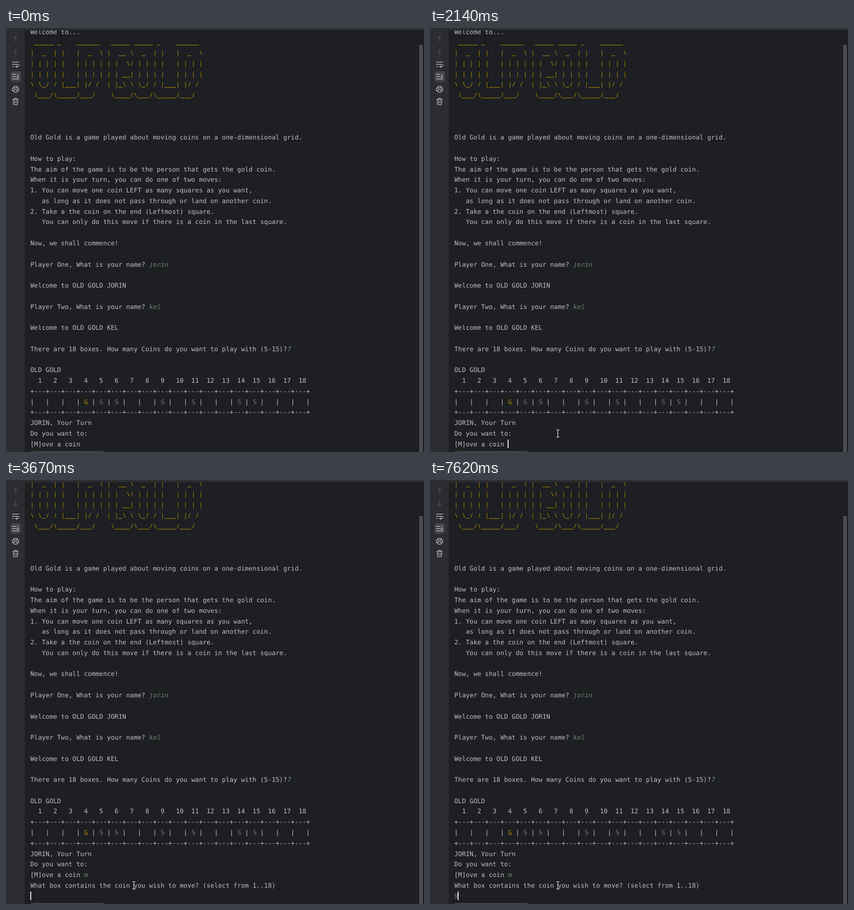
An HTML page with a canvas that plays this animation: 744x753 px, repeating every 8000 ms.

```html
<!DOCTYPE html>
<html lang="en">
<head>
<meta charset="utf-8">
<title>Old Gold console</title>
<style>
html, body { margin: 0; width: 100%; height: 100%; overflow: hidden; background: #1e1f22; }
canvas { display: block; }
</style>
</head>
<body>
<canvas id="stage" width="744" height="753"></canvas>
<script>
const W = 744, H = 753, LOOP = 8000;
const ctx = document.getElementById('stage').getContext('2d', { alpha: false });

const LEFT = 43.3, CHAR = 6.83, ROW = 18.77, LAST_ROW = 39, BASE = 742.6;
const TEXT_FONT = '11.34px "DejaVu Sans Mono", monospace';
const LOGO_FONT = '500 11.38px "Noto Sans Mono", monospace';
const BG = '#1e1f22', PANEL = '#2b2d30', TEXT = '#bcbec4', GOLD = '#a68a0d',
      SILVER = '#74777c', INPUT = '#6a836e', ICON = '#ced0d6', DIM = '#55585d',
      THUMB = '#4b4c4f';

const NAMES = ['jorin', 'kel'];
const COINS = [5, 6, 9, 11, 14, 15], GOLD_BOX = 4, BOXES = 18;

const LOGO = String.raw`
 _____ _    ______   _____ _____ _    ______
|  _  | |   |  _  \ |  __ \  _  | |   |  _  \
| | | | |   | | | | | |  \/ | | | |   | | | |
| | | | |   | | | | | | __| | | | |   | | | |
\ \_/ / |___| |/ /  | |_\ \ \_/ / |___| |/ /
 \___/\_____/___/    \____/\___/\_____/___/`.split('\n').slice(1);

const boxes = Array.from({ length: BOXES }, (_, i) => i + 1);
const edge = '+---'.repeat(BOXES) + '+';

// Each row: [text, typed input]
const rows = [
  ['Welcome to...'],
  ...LOGO.map(() => []),
  [], [], [],
  ['Old Gold is a game played about moving coins on a one-dimensional grid.'],
  [],
  ['How to play:'],
  ['The aim of the game is to be the person that gets the gold coin.'],
  ['When it is your turn, you can do one of two moves:'],
  ['1. You can move one coin LEFT as many squares as you want,'],
  ['   as long as it does not pass through or land on another coin.'],
  ['2. Take a the coin on the end (Leftmost) square.'],
  ['   You can only do this move if there is a coin in the last square.'],
  [],
  ['Now, we shall commence!'],
  [],
  ['Player One, What is your name? ', NAMES[0]],
  [],
  ['Welcome to OLD GOLD ' + NAMES[0].toUpperCase()],
  [],
  ['Player Two, What is your name? ', NAMES[1]],
  [],
  ['Welcome to OLD GOLD ' + NAMES[1].toUpperCase()],
  [],
  ['There are 18 boxes. How many Coins do you want to play with (5-15)?', '7'],
  [],
  ['OLD GOLD'],
  [boxes.map(n => ('  ' + n).padEnd(4)).join('')],
  [edge],
  ['|   '.repeat(BOXES) + '|'],
  [edge],
  [NAMES[0].toUpperCase() + ', Your Turn'],
  ['Do you want to:'],
  ['[M]ove a coin ']
];
const LOGO_ROW = 1, BOARD_ROW = 35;
const QUESTION = 'What box contains the coin you wish to move? (select from 1..18)';

const colX = col => LEFT + col * CHAR;

function write(str, col, row, color = TEXT, font = TEXT_FONT) {
  ctx.font = font;
  ctx.fillStyle = color;
  ctx.fillText(str, colX(col), Math.round(BASE + (row - LAST_ROW) * ROW));
}

const writeInput = (str, col, row) => write(str, col, row, INPUT, 'italic ' + TEXT_FONT);

function rect(x, y, w, h, color) {
  ctx.fillStyle = color;
  ctx.fillRect(x, y, w, h);
}

function icon(cy, d, color = ICON) {
  ctx.save();
  ctx.translate(17, cy);
  ctx.strokeStyle = color;
  ctx.lineWidth = 1;
  ctx.stroke(new Path2D(d));
  ctx.restore();
}

function drawToolbar() {
  rect(0, 0, 33.5, H, PANEL);
  rect(0, 0, W, 4, PANEL);
  ctx.fillStyle = '#43454a';
  ctx.beginPath();
  ctx.roundRect(8, 77, 18.5, 18.5, 3.5);
  ctx.fill();
  icon(19.5, 'M0 5V-5M-4 -1L0 -5L4 -1', DIM);
  icon(42, 'M0 -5V5M-4 1L0 5L4 1', DIM);
  icon(64.5, 'M-6 -4H6M-6 0H4Q6 0 6 2T4 4H0M2.5 1.5L0 4L2.5 6.5M-6 4H-3');
  icon(86.5, 'M-6 -4H1M-6 0H1M-6 4H6M4 -5V2M1.5 -.5L4 2L6.5 -.5');
  icon(108.5, 'M-3 -2V-5H3V-2M-3 3H-5.5V-2H5.5V3H3M-3 1H3V5.5H-3Z');
  icon(130.5, 'M-5.5 -3.5H5.5M-2 -3.5V-5.5H2V-3.5M-4 -3.5L-3.5 5.5H3.5L4 -3.5M-1.3 -1V3M1.3 -1V3');
}

function drawConsole(t) {
  const scroll = t < 3470 ? 0 : t < 3670 ? 1 : 2;
  ctx.save();
  ctx.beginPath();
  ctx.rect(34, 4, W - 34, H - 4);
  ctx.clip();
  rows.forEach(([str = '', typed], i) => {
    write(str, 0, i - scroll);
    if (typed) writeInput(typed, str.length, i - scroll);
  });
  LOGO.forEach((line, i) => write(line, 0, LOGO_ROW + i - scroll, GOLD, LOGO_FONT));
  const board = BOARD_ROW - scroll;
  write('G', GOLD_BOX * 4 - 2, board, GOLD);
  COINS.forEach(n => write('S', n * 4 - 2, board, SILVER));
  if (t >= 2270) writeInput('m', 14, LAST_ROW - scroll);
  if (t >= 3670) write(QUESTION, 0, LAST_ROW - 1);
  if (t >= 7620) writeInput('9', 0, LAST_ROW);
  ctx.restore();

  const top = 30 + scroll * 17;
  rect(735.5, top, 6.5, H - top, THUMB);
  rect(44, 751.5, 129.5, 2, THUMB);
}

// The caret toggles at each of these times.
const BLINKS = [1140, 1600, 2140, 3130, 3470, 4670, 5210, 5740, 6210, 6750, 7220];

function drawCaret(t) {
  if (BLINKS.filter(b => t >= b).length % 2 === 0) return;
  const col = t < 2270 ? 14 : t < 3470 ? 15 : t < 7620 ? 0 : 1;
  rect(Math.floor(colX(col) - 0.2), 731, 2, 15, ICON);
}

const clamp = v => Math.min(1, Math.max(0, v));
const ease = v => v * v * (3 - 2 * v);
const mix = (a, b, v) => a + (b - a) * v;
const quad = (a, b, c, v) => mix(mix(a, b, v), mix(b, c, v), v);
// Progress from 0 to 1 in n even jumps.
const stepped = (t, from, to, n) => clamp(Math.floor((t - from) / (to - from) * n + 1e-6) / n);

function pointerAt(t) {
  if (t < 930) {
    const v = ease(stepped(t, 70, 860, 12));
    return [quad(597, 360, 201, v), quad(750, 661, 731, v)];
  }
  if (t < 1256) return [201, t < 990 ? 731.5 : 732];
  const v = ease(stepped(t, 1190, 1600, 6));
  return [mix(201, 227.5, v), mix(732, 720, v)];
}

function drawPointer(t) {
  if (t < 70) return;
  const [x, y] = pointerAt(t);
  if (t >= 1140 && t < 1256) {
    ctx.fillStyle = '#85820f';
    ctx.beginPath();
    ctx.arc(199, 732, 10.3, 0, Math.PI * 2);
    ctx.fill();
  }
  const beam = new Path2D('M-2.8 -6.5H-.9L0 -5.8L.9 -6.5H2.8M0 -5.8V5.8M-2.8 6.5H-.9L0 5.8L.9 6.5H2.8');
  ctx.save();
  ctx.translate(Math.floor(x) + 0.5, Math.round(y));
  ctx.strokeStyle = 'rgba(20,20,20,.6)';
  ctx.lineWidth = 2.4;
  ctx.stroke(beam);
  ctx.strokeStyle = '#e4e4e4';
  ctx.lineWidth = 1.1;
  ctx.stroke(beam);
  ctx.restore();
}

function draw(t) {
  ctx.textRendering = 'geometricPrecision';
  rect(0, 0, W, H, BG);
  drawToolbar();
  drawConsole(t);
  drawCaret(t);
  drawPointer(t);
}

const start = performance.now();
function tick() {
  draw((performance.now() - start) % LOOP);
  requestAnimationFrame(tick);
}
tick();
</script>
</body>
</html>
```
